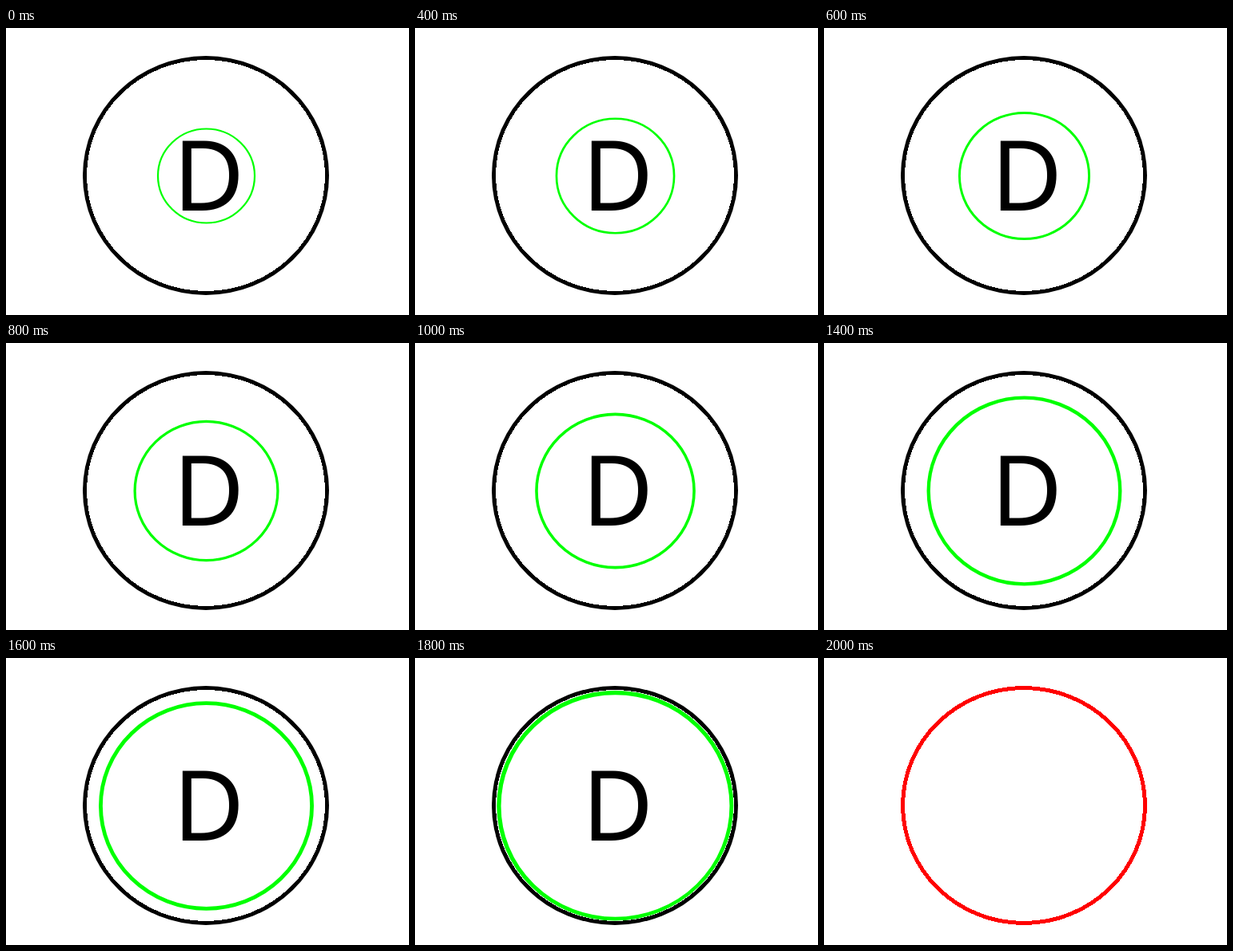
These frames come from a looping animation (504x360 px, 2500 ms). An HTML page:

```html
<!DOCTYPE html>
<html lang="en">
<head>
<meta charset="utf-8">
<title>Growing ring</title>
<style>
  html, body { margin: 0; width: 100%; height: 100%; overflow: hidden; background: #fff; }
  svg { display: block; }
  #hole { fill: #fff; shape-rendering: crispEdges; }
  #pulse { fill: none; stroke: #0f0; }
  text { font: 122px "Noto Sans", "Open Sans", sans-serif; }
  .done #disc { fill: #f00; shape-rendering: crispEdges; }
  .done #pulse, .done text { visibility: hidden; }
</style>
</head>
<body>
<svg width="504" height="360" viewBox="0 0 504 360">
  <clipPath id="inside"><ellipse cx="250" cy="185" rx="148.3" ry="144.4"/></clipPath>
  <ellipse id="disc" cx="250" cy="185" rx="154" ry="150"/>
  <ellipse id="hole" cx="250" cy="185" rx="149" ry="145"/>
  <g clip-path="url(#inside)"><ellipse id="pulse" cx="250.5" cy="185.5"/></g>
  <text x="209" y="229">D</text>
</svg>
<script>
  const LOOP = 2500, STEP = 100, GROWTH = 1.05, RED_STEP = 20;
  const START = { rx: 60.5, ry: 59, width: 2.2 };
  const BLUR = 0.35;

  const svg = document.querySelector('svg');
  const pulse = document.getElementById('pulse');

  function draw(time) {
    const step = Math.min(RED_STEP, Math.floor(time % LOOP / STEP));
    const scale = GROWTH ** step;
    pulse.setAttribute('rx', START.rx * scale);
    pulse.setAttribute('ry', START.ry * scale);
    pulse.style.strokeWidth = START.width * scale;
    // The ring softens as it is enlarged.
    pulse.style.filter = `blur(${BLUR * (scale - 1)}px)`;
    svg.classList.toggle('done', step === RED_STEP);
  }

  const begin = performance.now();
  function tick() {
    draw(performance.now() - begin);
    requestAnimationFrame(tick);
  }
  tick();
</script>
</body>
</html>
```
